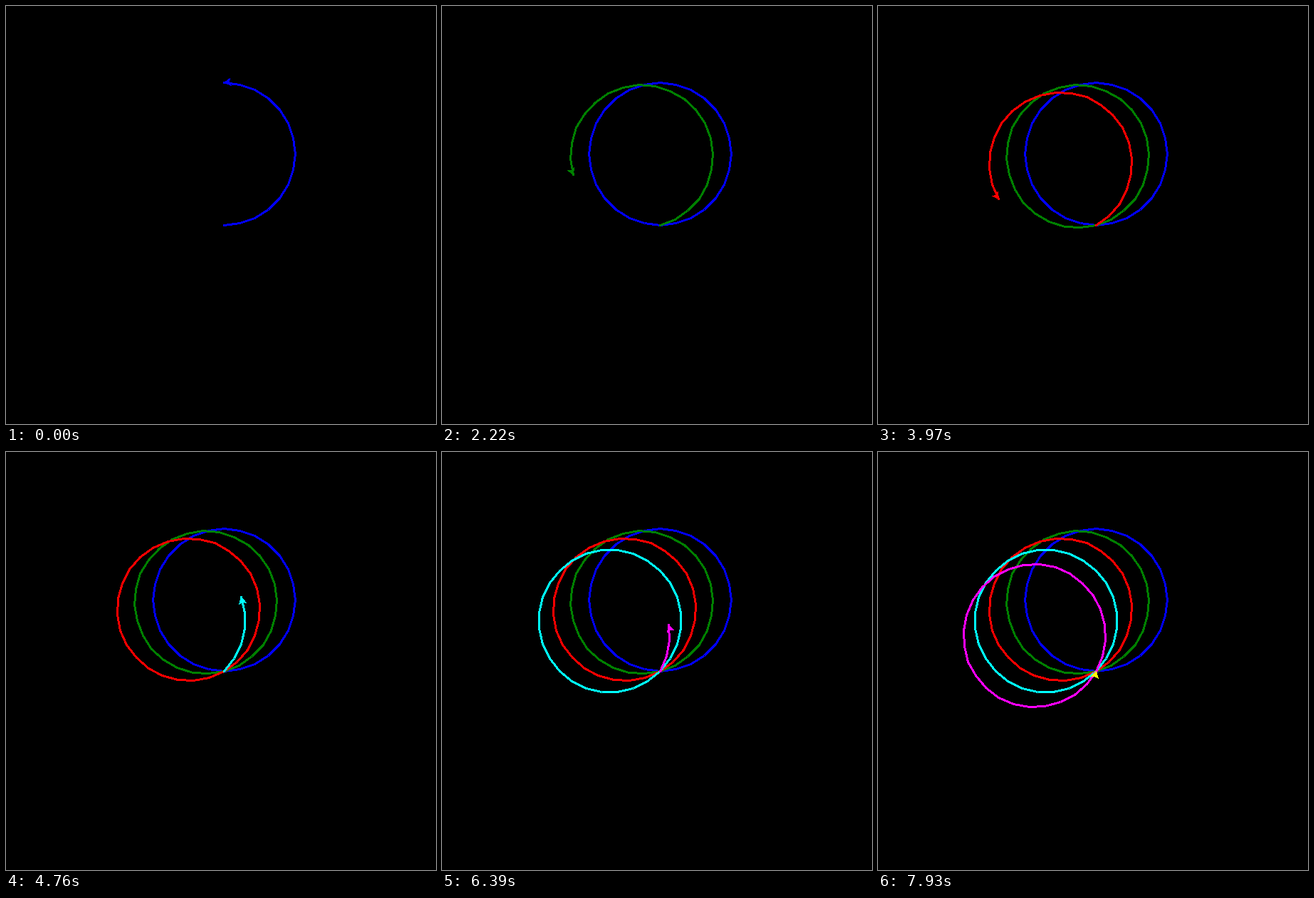
Write an HTML page that moves like this. It is 604 by 586 pixels and loops after 7990 ms.

```html
<!DOCTYPE html>
<html lang="en">
<head>
<meta charset="utf-8">
<title>Turtle circles</title>
<style>
  html, body { margin: 0; width: 100%; height: 100%; overflow: hidden; background: #000; }
  svg { display: block; }
</style>
</head>
<body>
<svg id="stage" width="604" height="586" shape-rendering="crispEdges"
     fill="none" stroke-linecap="round" stroke-linejoin="round"></svg>
<script>
const LOOP = 7990;
const COLORS = ['blue', 'green', 'red', 'cyan', 'magenta', 'yellow'];
const ORIGIN = { x: 306, y: 307 };
const RADIUS = 100, SIDES = 28, TILT = 15, TURN = 360 / SIDES;
// Ticks per circle: one opening turn, a move and a turn per side, then three closing ticks.
const TICKS = 60;
// The drawing speed wavers a little: [ms, tick] pairs, linear in between.
const PACE = [
  [0, 28], [30, 29], [840, 55], [1500, 78], [1650, 83], [2470, 111],
  [2970, 128], [3280, 139], [3970, 162], [4100, 167], [4910, 195],
  [5550, 216], [5710, 221], [6520, 251], [7240, 274], [7340, 277], [7930, 299]
];

const stage = document.getElementById('stage');

function add(tag, attributes) {
  const node = document.createElementNS('http://www.w3.org/2000/svg', tag);
  for (const name in attributes) node.setAttribute(name, attributes[name]);
  return stage.appendChild(node);
}

const lines = COLORS.map(color => add('polyline', { stroke: color, 'stroke-width': 3 }));
const turtle = add('polygon', { 'stroke-width': 1 });

const rad = degrees => degrees * Math.PI / 180;
const snap = v => Math.round(v) + 0.5;

function vertex(circle, k) {
  const start = rad(TILT * circle), angle = start + rad(TURN * k);
  return [
    ORIGIN.x + RADIUS * (Math.sin(angle) - Math.sin(start)),
    ORIGIN.y + RADIUS * (Math.cos(angle) - Math.cos(start))
  ];
}

function tickAt(ms) {
  const i = PACE.findIndex(([time]) => time > ms);
  if (i < 0) return PACE[PACE.length - 1][1];
  const [t0, a] = PACE[i - 1], [t1, b] = PACE[i];
  return Math.floor(a + (b - a) * (ms - t0) / (t1 - t0) + 1e-6);
}

function headingAt(circle, phase) {
  if (phase > 57) return TILT * (circle + 1);
  if (phase === 57) return TILT * circle;
  return TILT * circle + TURN / 2 + TURN * Math.floor(phase / 2);
}

function drawTurtle([x, y], heading, color) {
  const c = Math.cos(rad(heading)), s = Math.sin(rad(heading));
  const points = [[0, 0], [-9, 5], [-7, 0], [-9, -5]].map(([along, side]) =>
    [snap(x + along * c - side * s), snap(y - along * s - side * c)]);
  turtle.setAttribute('points', points.join(' '));
  turtle.setAttribute('fill', color);
  turtle.setAttribute('stroke', color);
}

function draw(ms) {
  const tick = tickAt(ms);
  const circle = Math.floor(tick / TICKS), phase = tick % TICKS;
  const sides = Math.min(SIDES, Math.floor((phase + 1) / 2));
  lines.forEach((line, i) => {
    const count = i < circle ? SIDES : i === circle ? sides : 0;
    const points = count
      ? Array.from({ length: count + 1 }, (_, k) => vertex(i, k).map(snap))
      : [];
    line.setAttribute('points', points.join(' '));
  });
  const color = COLORS[phase === TICKS - 1 ? circle + 1 : circle];
  drawTurtle(vertex(circle, sides), headingAt(circle, phase), color);
}

const begin = performance.now();
function frame() {
  draw((performance.now() - begin) % LOOP);
  requestAnimationFrame(frame);
}
frame();
</script>
</body>
</html>
```
